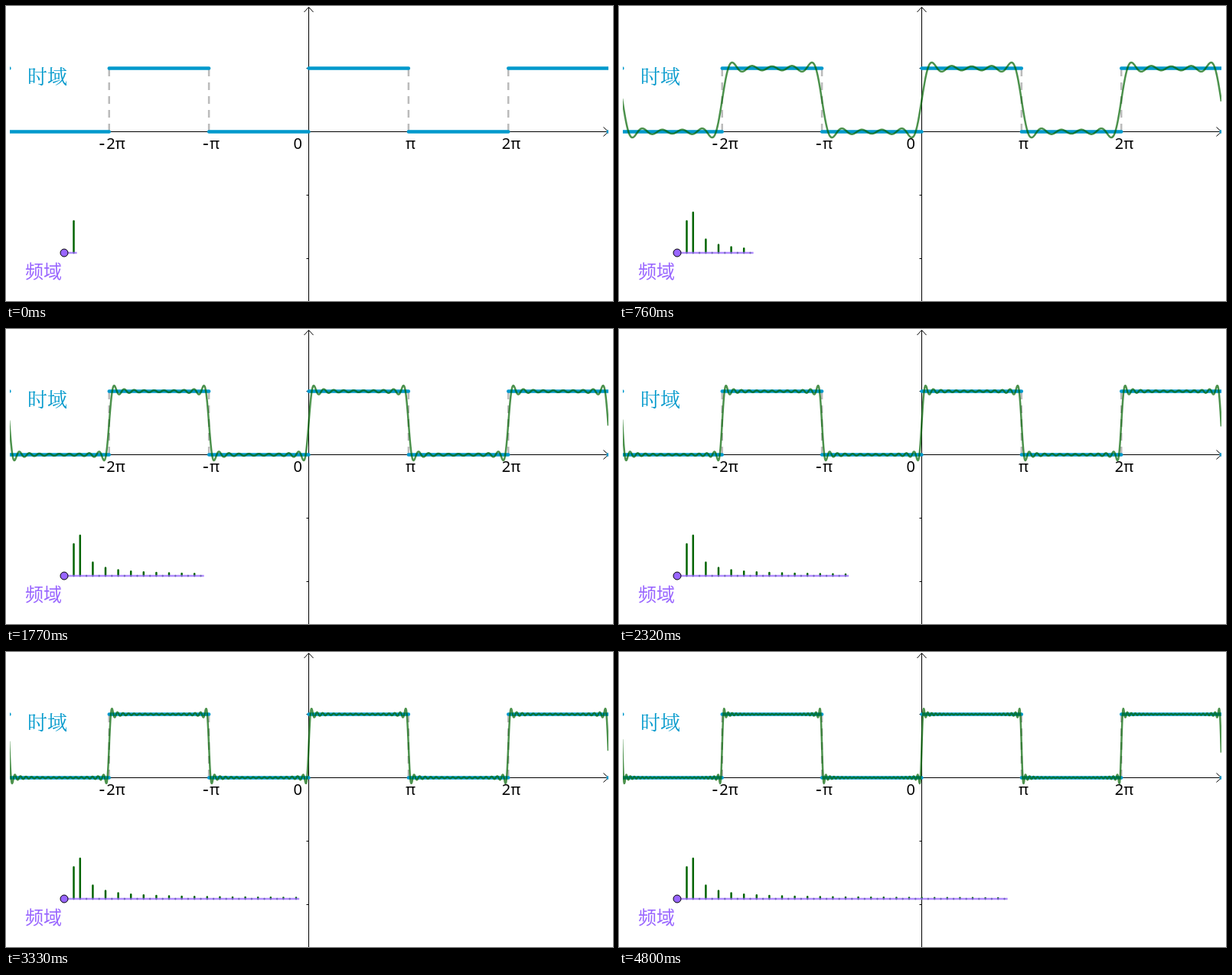
An HTML page that plays this animation: 793x386 px, repeating every 5.26 s.

```html
<!DOCTYPE html>
<html lang="zh-CN">
<head>
<meta charset="utf-8">
<title>时域与频域</title>
<style>
  html, body { margin: 0; width: 100%; height: 100%; overflow: hidden; background: #fff; }
  svg { display: block; width: 100%; height: 100%; }
  path, line { fill: none; }
  .axis { stroke: #000; stroke-width: 1; }
  .dash { stroke: #bbb; stroke-width: 2.5; stroke-dasharray: 10 8; }
  .wave { stroke: #09c; stroke-width: 4.5; stroke-linecap: round; }
  .sum { stroke: #006400; stroke-width: 2.5; stroke-opacity: .7; stroke-linejoin: round; }
  .bars { stroke: #006400; stroke-width: 2.5; stroke-linecap: round; }
  .base { stroke: #96f; stroke-width: 2.5; stroke-opacity: .75; }
  .num { font: 20px "Noto Sans", "Open Sans", sans-serif; }
  .minus { font-size: 24px; }
  .time { font: 26px "Noto Serif CJK SC", "Noto Sans CJK SC", serif; fill: #09c; }
  .freq { font: 24px "Noto Sans CJK SC", "Noto Sans CJK", sans-serif; fill: #96f; }
</style>
</head>
<body>
<svg viewBox="0 0 793 386">
  <clipPath id="view"><rect x="5" y="0" width="782" height="386"/></clipPath>
  <path class="axis" d="M5 164.5H787M780.5 158.5L787 164.5L780.5 170.5M395.5 386V2M389.5 8L395.5 1.5L401.5 8M392.5 81.5h3M392.5 247.5h3M392.5 330.5h3"/>
  <g clip-path="url(#view)">
    <path class="dash" id="dash"/>
    <path class="wave" id="wave"/>
    <path class="sum" id="sum"/>
  </g>
  <path class="bars" id="bars"/>
  <line class="base" id="base" x1="76" y1="323" y2="323"/>
  <circle cx="76" cy="323" r="5" fill="#96f" stroke="#000"/>
  <g class="num">
    <text class="minus" x="121.5" y="187">-</text><text x="131.2" y="186.5">2π</text>
    <text class="minus" x="257" y="187">-</text><text x="266" y="186.5">π</text>
    <text x="375.5" y="186.5">0</text>
    <text x="522" y="186.5">π</text>
    <text x="647.8" y="186.5">2π</text>
  </g>
  <text class="time" x="28" y="102">时域</text>
  <text class="freq" x="25" y="355.5">频域</text>
</svg>
<script>
const LOOP = 5260;
const STARTS = [0, 300, 760, 1310, 1770, 2320, 2780, 3330, 3790, 4250, 4800];
const X0 = 395.5, UNIT = 41.5, HALF = Math.PI * UNIT;
const LOW = 164.5, HIGH = 81.5, AMP = LOW - HIGH;
const BAR_X = 88.5, BAR_STEP = 8.3, BASE_Y = 323;
const $ = id => document.getElementById(id);
const set = (id, name, value) => $(id).setAttribute(name, value);

// Coefficient of sin(nx) in the 0/1 square wave; n = 0 is the mean.
const coef = n => n === 0 ? 0.5 : n % 2 ? 2 / (n * Math.PI) : 0;

function drawSquare() {
  let wave = `M${X0 - 3 * HALF} ${HIGH}h.01M${X0 + 3 * HALF} ${LOW}h.01`;
  let dash = "";
  for (let k = -3; k < 3; k++) {
    const x = X0 + k * HALF;
    wave += `M${x} ${k % 2 ? LOW : HIGH}h${HALF}`;
    if (k > -3 && k !== 0) dash += `M${x} ${HIGH + .5}V${LOW}`;
  }
  set("wave", "d", wave);
  set("dash", "d", dash);
}

function sumPath(count) {
  if (!count) return "";
  const pts = [];
  for (let px = 4.1; px <= 786.95; px += 0.4) {
    const x = (px - X0) / UNIT;
    let y = coef(0);
    for (let n = 1; n <= count; n += 2) y += coef(n) * Math.sin(n * x);
    pts.push(px.toFixed(2) + " " + (LOW - AMP * y).toFixed(2));
  }
  return "M" + pts.join("L");
}

function barPath(count) {
  let d = "";
  for (let n = 0; n <= count; n++) {
    const h = Math.max(coef(n) * AMP, 0.01);
    d += `M${BAR_X + n * BAR_STEP} ${BASE_Y}v${-h}`;
  }
  return d;
}

let shown = -1;
function render(t) {
  const step = STARTS.filter(s => s <= t % LOOP).length - 1;
  if (step === shown) return;
  shown = step;
  const count = step * 5;
  set("sum", "d", sumPath(count));
  set("bars", "d", barPath(count));
  set("base", "x2", BAR_X + (count + 0.5) * BAR_STEP);
}

drawSquare();
render(0);
const begin = performance.now();
(function tick() {
  render(performance.now() - begin);
  requestAnimationFrame(tick);
})();
</script>
</body>
</html>
```
